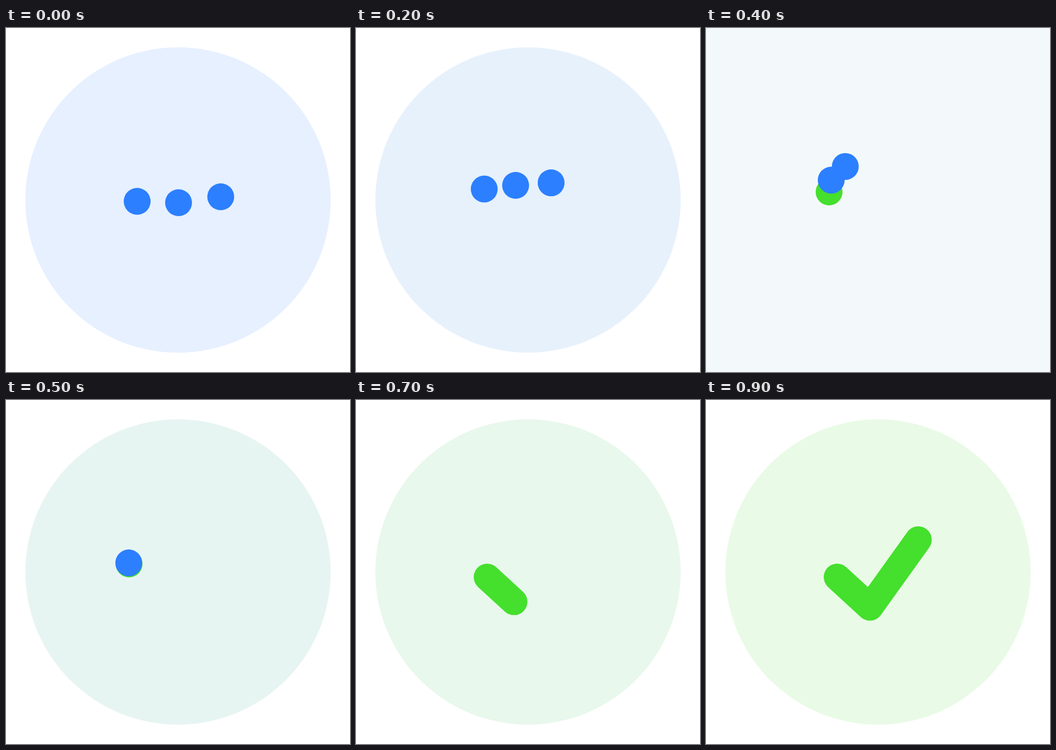
An HTML page with a canvas that plays this animation: 640 px wide and 640 px high, repeating every 3700 ms.

```html
<!DOCTYPE html>
<html lang="en">
<head>
<meta charset="utf-8">
<title>Loading to done</title>
<style>
  html, body { margin: 0; width: 100%; height: 100%; overflow: hidden; background: #fff; }
  canvas { display: block; width: 640px; height: 640px; }
</style>
</head>
<body>
<canvas id="stage" width="640" height="640"></canvas>
<script>
const ctx = document.getElementById('stage').getContext('2d');
const LOOP = 3700, STEP = 100, LAST = 9, FLASH = 4, R = 25;
const BLUE = [44, 127, 255], GREEN = [69, 223, 45], WHITE = [255, 255, 255];

// All dots swing up and over into the same landing point.
const landing = [229, 305];
const dots = [
  { steps: 4, path: [[244, 322.5], [236, 273], [220.5, 283], landing] },
  { steps: 4.5, path: [[321, 325], [270, 239], [220, 276], landing] },
  { steps: 5.02, path: [[399.5, 314], [306, 237], [208, 242], landing] }
];
const tick = [[244, 329.5], [305, 385.5], [395, 260]];

const clamp = (v, lo, hi) => Math.max(lo, Math.min(hi, v));
const mix = (a, b, k) => a.map((v, i) => v + (b[i] - v) * k);
const rgb = c => `rgb(${c.map(Math.round).join(',')})`;
const easeIn = s => 0.2 * s + 0.8 * s ** 3;

// Point on a Bezier curve with any number of control points.
function bezier(pts, u) {
  while (pts.length > 1) pts = pts.slice(1).map((p, i) => mix(pts[i], p, u));
  return pts[0];
}

function disc([x, y], r, color) {
  ctx.fillStyle = rgb(color);
  ctx.beginPath();
  ctx.arc(x, y, r, 0, Math.PI * 2);
  ctx.fill();
}

// A pale tint turns from blue to green; the flash fills the stage at half strength.
function background(n) {
  const hue = mix(BLUE, GREEN, clamp((n - 1) / (LAST - 1), 0, 1));
  const flash = n === FLASH;
  ctx.fillStyle = rgb(flash ? mix(WHITE, hue, 0.06) : WHITE);
  ctx.fillRect(0, 0, 640, 640);
  if (!flash) disc([320, 320], 284, mix(WHITE, hue, 0.12));
}

// Reach 0..1 covers the short arm, 1..2 the long one.
function drawTick(reach) {
  ctx.strokeStyle = rgb(GREEN);
  ctx.lineWidth = R * 2;
  ctx.lineCap = ctx.lineJoin = 'round';
  ctx.beginPath();
  ctx.moveTo(...tick[0]);
  for (let i = 0; i < 2 && reach > i; i++) {
    ctx.lineTo(...mix(tick[i], tick[i + 1], Math.min(1, reach - i)));
  }
  ctx.stroke();
}

function draw(t) {
  const n = Math.min(LAST, Math.floor(t / STEP));
  const reach = clamp((n - 5.76) * 0.66, 0, 2);
  background(n);
  if (reach > 0) drawTick(reach);
  else if (n >= FLASH) disc(landing, R, GREEN);
  for (const { steps, path } of dots) {
    if (n < steps) disc(bezier(path, easeIn(n / steps)), R, BLUE);
  }
}

const start = performance.now();
function loop() {
  draw((performance.now() - start) % LOOP);
  requestAnimationFrame(loop);
}
loop();
</script>
</body>
</html>
```
